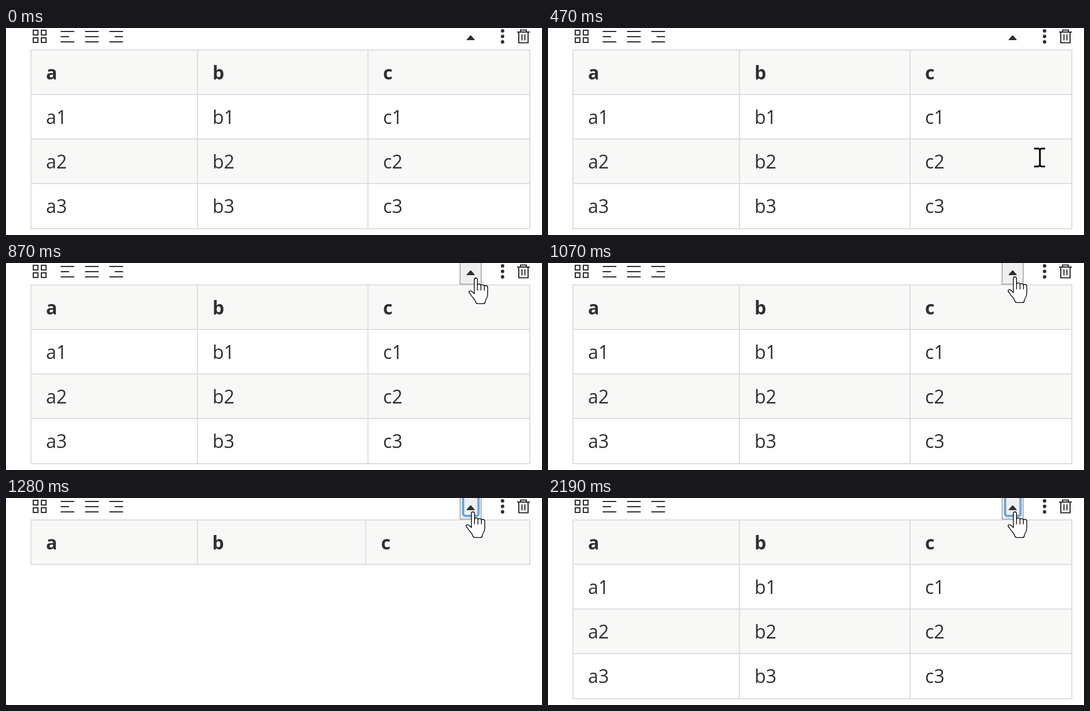
Recreate the animation shown at these times as an HTML page. Size 924 px wide and 358 px high, loop 2.74 s.

```html
<!DOCTYPE html>
<html lang="en">
<head>
<meta charset="utf-8">
<title>Collapsing table</title>
<style>
  html, body { margin: 0; width: 100%; height: 100%; overflow: hidden; background: #fff; }
  svg { display: block; width: 924px; height: 358px; }
  text { font: 32px "Open Sans", "Noto Sans", sans-serif; fill: #303033; }
  .head text { font-weight: 700; }
  .icon { fill: none; stroke: #303030; stroke-width: 2; }
  .solid { fill: #303030; }
  .grid { fill: none; stroke: #dfdfe2; stroke-width: 2; }
  .stripe { fill: #f8f8f7; }

  .open, .closed, .beam, .hand, .hover, .focus, .press {
    animation: 2740ms step-end infinite;
  }
  .open { animation-name: open; }
  .closed { animation-name: closed; }
  .beam { animation-name: beam; }
  .hand { animation-name: hand; }
  .hover { animation-name: hover; }
  .focus { animation-name: focus; }
  .press { animation-name: press; }

  @keyframes open {
    0% { opacity: 1; }
    46.71% { opacity: 0; }
    79.92%, 100% { opacity: 1; }
  }
  @keyframes closed {
    0% { opacity: 0; }
    46.71% { opacity: 1; }
    79.92%, 100% { opacity: 0; }
  }
  @keyframes beam {
    0% { opacity: 0; transform: translate(867px, 345px); }
    12.4% { opacity: 1; transform: translate(867px, 345px); }
    14.96% { opacity: 1; transform: translate(858px, 284px); }
    17.15% { opacity: 1; transform: translate(848px, 224px); }
    19.7% { opacity: 1; transform: translate(838px, 178px); }
    21.89% { opacity: 1; transform: translate(830px, 143px); }
    24.45% { opacity: 1; transform: translate(823px, 111px); }
    26.64% { opacity: 1; transform: translate(818px, 62px); }
    29.19% { opacity: 1; transform: translate(815px, 48px); }
    31.75%, 100% { opacity: 0; transform: translate(815px, 48px); }
  }
  @keyframes hand {
    0% { opacity: 0; transform: translate(5px, 2px); }
    31.75% { opacity: 1; transform: translate(5px, 2px); }
    34.3% { opacity: 1; transform: translate(3px, 1px); }
    36.49% { opacity: 1; transform: translate(1px, 0); }
    39.05%, 100% { opacity: 1; transform: none; }
  }
  @keyframes hover {
    0% { opacity: 0; }
    31.75%, 100% { opacity: 1; }
  }
  @keyframes focus {
    0% { opacity: 0; stroke: #6aa9df; }
    44.52% { opacity: 1; stroke: #e0b000; }
    46.71% { opacity: 1; stroke: #6aa9df; }
    75.18% { opacity: 1; stroke: #e0b000; }
    79.92%, 100% { opacity: 1; stroke: #6aa9df; }
  }
  @keyframes press {
    0% { opacity: 0; }
    44.52% { opacity: .5; }
    46.71% { opacity: 0; }
    75.18% { opacity: .5; }
    79.92%, 100% { opacity: 0; }
  }
</style>
</head>
<body>
<svg viewBox="0 0 924 358">
  <!-- table -->
  <g class="open">
    <path class="stripe" d="M43 38H903V115H43ZM43 192H903V269H43Z"/>
    <path class="grid" d="M43 38H903V347H43ZM43 115H903M43 192H903M43 269H903M330 38V347M624 38V347"/>
    <g class="head">
      <text x="69" y="89">a</text><text x="356" y="89">b</text><text x="650" y="89">c</text>
    </g>
    <text x="69" y="166">a1</text><text x="356" y="166">b1</text><text x="650" y="166">c1</text>
    <text x="69" y="243">a2</text><text x="356" y="243">b2</text><text x="650" y="243">c2</text>
    <text x="69" y="320">a3</text><text x="356" y="320">b3</text><text x="650" y="320">c3</text>
  </g>
  <g class="closed">
    <path class="stripe" d="M43 38H903V115H43Z"/>
    <path class="grid" d="M43 38H903V115H43ZM330 38V115M620 38V115"/>
    <g class="head">
      <text x="69" y="89">a</text><text x="355.5" y="89">b</text><text x="646.5" y="89">c</text>
    </g>
  </g>

  <!-- toolbar -->
  <path class="icon" d="M47 4h8v8h-8zM61 4h8v8h-8zM47 17h8v8h-8zM61 17h8v8h-8z"/>
  <path class="icon" stroke-linecap="round" d="M95 6H117M95 15H108M95 24H117M137 6H159M137 15H159M137 24H159M179 6H201M188 15H201M179 24H201"/>
  <g class="solid">
    <circle cx="856" cy="5" r="3"/><circle cx="856" cy="14.5" r="3"/><circle cx="856" cy="24" r="3"/>
  </g>
  <path class="icon" d="M881 7H903M887 7V3.5H897V7M884 7V25.5H900V7M889.5 11V21.5M894.5 11V21.5"/>

  <!-- collapse button -->
  <rect class="hover" x="782.75" y="-5" width="36.5" height="41.5" fill="#efefef" stroke="#a2a2a2" stroke-width="1.5"/>
  <rect class="focus" x="788" y="-3" width="26.5" height="34" rx="4" fill="none" stroke-width="4"/>
  <path class="solid" d="M794.5 21Q793.5 20.5 794.5 19.5L800 13.2Q801 12.2 802 13.2L807.5 19.5Q808.5 20.5 807.5 21Z"/>

  <!-- pointers -->
  <path class="beam" d="M-10 -17H-2L0 -15.5L2 -17H9V-14H3L1.5 -13V13L3 14H9V17H2L0 15.5L-2 17H-10V14H-3L-1.5 13V-13L-3 -14H-10Z"/>
  <g class="hand" fill="#fff" stroke="#000" stroke-width="1.3" stroke-linejoin="round" stroke-linecap="round">
    <path d="M802.3 51V26.5Q802.3 24 804.8 24T807.6 26.5V37Q808 34.4 810.5 34.4T813.6 37Q814 35.6 816.5 35.6T819.5 38.2Q820 37 822.4 37T825.4 40V52Q825.4 57 822 62Q821 64 821 66Q820.5 68.3 818 68.3H808Q805.5 68.3 804.8 65.5Q804 62.5 800.5 58.5Q797 55 795.2 51.5L793.4 49Q792.3 46.6 795 46.3Q797.5 46 800 49Z"/>
    <path fill="none" d="M807.6 37V45M813.6 37V45M819.5 38.2V45"/>
  </g>
  <circle class="press" cx="805" cy="24" r="24" fill="#fff000"/>
</svg>
</body>
</html>
```
